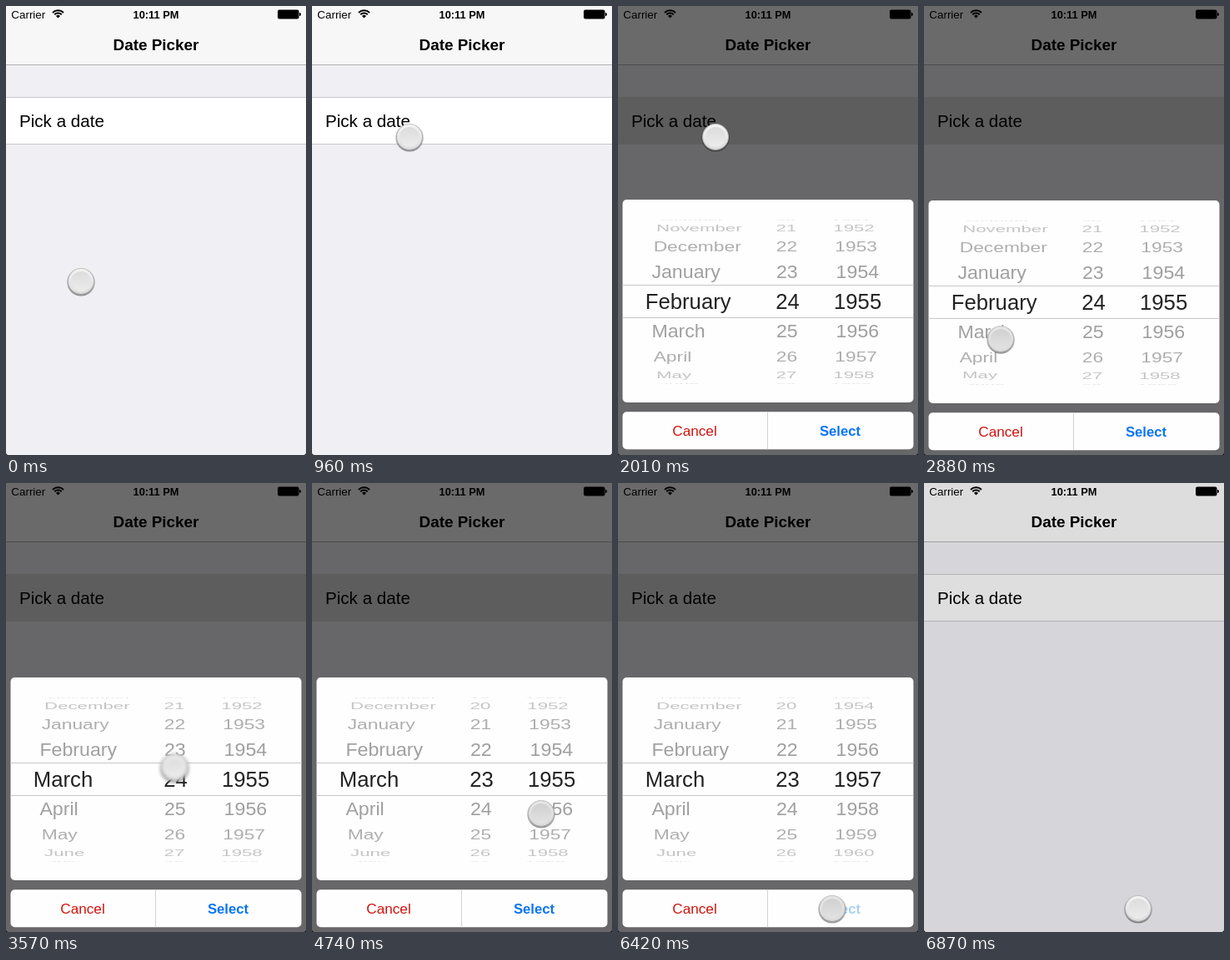
Recreate the animation shown at these times as an HTML page with a canvas. Size 360x538 px, loop 6900 ms.

```html
<!DOCTYPE html>
<html lang="en">
<head>
<meta charset="utf-8">
<title>Date Picker</title>
<style>
  html, body { margin: 0; width: 100%; height: 100%; overflow: hidden; background: #000; }
  canvas { display: block; }
</style>
</head>
<body>
<canvas id="stage" width="360" height="538"></canvas>
<script>
const W = 360, H = 538, LOOP = 6900;
const ctx = document.getElementById('stage').getContext('2d');
const FONT = '"Liberation Sans", Arial, sans-serif';
const MONTHS = ['January', 'February', 'March', 'April', 'May', 'June', 'July',
  'August', 'September', 'October', 'November', 'December'];

const mod = (n, m) => ((n % m) + m) % m;
const progress = (t, from, to) => Math.min(1, Math.max(0, (t - from) / (to - from)));
const smooth = u => u * u * (3 - 2 * u);
const easeIn = u => u * u;
const easeOut = u => u * (2 - u);
const ramp = (t, from, to) => smooth(progress(t, from, to));

// Pointer stops: time, x, y, easing of the way there
const PATH = [
  [510, 90, 330], [960, 117, 157], [2310, 117, 157],
  [2720, 92, 400], [2850, 92, 400], [3200, 95, 362], [3330, 95, 362],
  [3570, 202, 340, easeIn], [3740, 218, 420, easeOut], [4050, 218, 420],
  [4440, 218, 460], [4500, 218, 460], [4720, 275, 396], [4830, 275, 396],
  [5190, 275, 326], [5340, 275, 326], [5790, 257, 510]
];
const PRESSES = [[1590, 1680], [2780, 3230], [3960, 4470], [4720, 5220], [6420, 6600]];

function pointerAt(t) {
  const i = PATH.findIndex(stop => stop[0] > t);
  if (i === 0) return PATH[0].slice(1, 3);
  if (i < 0) return PATH[PATH.length - 1].slice(1, 3);
  const [t0, x0, y0] = PATH[i - 1], [t1, x1, y1, ease = smooth] = PATH[i];
  const u = ease(progress(t, t0, t1));
  return [x0 + (x1 - x0) * u, y0 + (y1 - y0) * u];
}

function rect(x, y, w, h, color) {
  ctx.fillStyle = color;
  ctx.fillRect(x, y, w, h);
}

function panel(x, y, w, h, r, color) {
  ctx.fillStyle = color;
  ctx.beginPath();
  ctx.roundRect(x, y, w, h, r);
  ctx.fill();
}

function text(str, x, y, size, color, align = 'left', weight = 'normal') {
  ctx.font = `${weight} ${size}px ${FONT}`;
  ctx.textAlign = align;
  ctx.fillStyle = color;
  ctx.fillText(str, x, y);
}

function drawStatusBar() {
  text('Carrier', 6.3, 15, 13.4, '#000');
  text('10:11 PM', 180, 15, 12.8, '#000', 'center', 'bold');

  ctx.strokeStyle = '#000';
  ctx.lineWidth = 2;
  for (const r of [6, 9.2]) {
    ctx.beginPath();
    ctx.arc(62.5, 14.5, r, -Math.PI * 0.75, -Math.PI * 0.25);
    ctx.stroke();
  }
  ctx.fillStyle = '#000';
  ctx.beginPath();
  ctx.moveTo(62.5, 14.5);
  ctx.arc(62.5, 14.5, 3.6, -Math.PI * 0.75, -Math.PI * 0.25);
  ctx.fill();

  panel(326, 4.5, 25.5, 11, 2, '#000');
  panel(352, 8, 2, 4, [0, 2, 2, 0], '#000');
}

function drawPage(highlight) {
  rect(0, 0, W, H, '#efeff4');
  rect(0, 0, W, 70, '#f7f7f7');
  rect(0, 70, W, 1, '#b2b2b2');
  drawStatusBar();
  text('Date Picker', 180, 52.5, 18.9, '#000', 'center', 'bold');

  const shade = 255 - 38 * highlight;
  rect(0, 109, W, 57, highlight === 1 ? '#d9d9d9' : '#c8c7cc');
  rect(0, 110, W, 55, `rgb(${shade},${shade},${shade})`);
  text('Pick a date', 16, 145, 20.6, '#000');
}

function drawRollingRows(wheel, cy) {
  const STEP = 21 * Math.PI / 180, RADIUS = 98.5;
  for (let i = Math.floor(wheel.pos) - 4; i <= wheel.pos + 5; i++) {
    const angle = (i - wheel.pos) * STEP, depth = 1 - Math.cos(angle);
    if (Math.abs(angle) > 1.52) continue;
    const zoom = 1 - 0.085 * depth, gray = 155 + 75 * depth;
    ctx.save();
    ctx.translate(180 + (wheel.x - 180) * zoom, cy + RADIUS * Math.sin(angle));
    ctx.scale(zoom, 1 - depth);
    text(wheel.label(i), 0, 8.3, 23.3, `rgb(${gray},${gray},${gray})`, wheel.align);
    ctx.restore();
  }
}

function drawLensRows(wheel, cy) {
  for (let i = Math.floor(wheel.pos) - 1; i <= wheel.pos + 2; i++) {
    text(wheel.label(i), wheel.lensX, cy + (i - wheel.pos) * 38 + 9, 25.7, '#222', wheel.align);
  }
}

function clipped(x, y, w, h, draw) {
  ctx.save();
  ctx.beginPath();
  ctx.rect(x, y, w, h);
  ctx.clip();
  draw();
  ctx.restore();
}

function drawSheet(top, t) {
  const left = 5.5, width = 349;
  panel(left, top, width, 243, 5, '#fefefe');
  const cy = top + 122;
  const wheels = [
    { pos: 1 + ramp(t, 2850, 3350), x: 39.6, lensX: 32.8, align: 'left', label: i => MONTHS[mod(i, 12)] },
    { pos: 24 - ramp(t, 4080, 4620), x: 203, lensX: 203.5, align: 'center', label: i => String(mod(i - 1, 31) + 1) },
    { pos: 1955 + 2 * ramp(t, 4850, 5450), x: 288, lensX: 287.6, align: 'center', label: String }
  ];
  const rolling = () => wheels.forEach(wheel => drawRollingRows(wheel, cy));
  clipped(left, cy - 100, width, 80, rolling);
  clipped(left, cy + 20, width, 80, rolling);
  clipped(left, cy - 19, width, 38, () => wheels.forEach(wheel => drawLensRows(wheel, cy)));
  rect(left, cy - 20, width, 1, '#c8c8c8');
  rect(left, cy + 19, width, 1, '#c8c8c8');

  panel(left, top + 254.3, width, 45, 5, '#fefefe');
  rect(179, top + 254.3, 1, 45, '#d2d2d2');
  text('Cancel', 92, top + 283, 17.2, '#d0140f', 'center');
  text('Select', 266.5, top + 283, 16.7, t >= 6420 ? '#a9d2f3' : '#0a75f5', 'center', 'bold');
}

function disc(x, y, r, topColor, bottomColor) {
  const fill = ctx.createLinearGradient(0, y - r, 0, y + r);
  fill.addColorStop(0, topColor);
  fill.addColorStop(1, bottomColor);
  ctx.fillStyle = fill;
  ctx.beginPath();
  ctx.arc(x, y, r, 0, 2 * Math.PI);
  ctx.fill();
}

function drawPointer(t) {
  const pressed = PRESSES.some(([from, to]) => t >= from && t < to);
  const [x, y] = pointerAt(t), [lastX, lastY] = pointerAt(t - 30);
  const blur = Math.hypot(x - lastX, y - lastY) * 0.08;
  ctx.filter = blur > 0.3 ? `blur(${blur}px)` : 'none';
  disc(x, y + 0.8, 16.8, 'rgba(0,0,0,.12)', 'rgba(0,0,0,.4)');
  disc(x, y, 16, '#c4c4c4', '#a0a0a0');
  disc(x, y, 15, pressed ? '#e6e6e6' : '#f4f4f4', pressed ? '#dadada' : '#dcdcdc');
  disc(x, y, 12, pressed ? '#d0d0d0' : '#dcdcdc', pressed ? '#e2e2e2' : '#ececec');
  ctx.filter = 'none';
}

function sheetTop(t) {
  const s = Math.max(0, t - 1770) / 1000 * 45;
  const rest = t < 2310 ? 232 : 233;
  const hidden = (1 + s) * Math.exp(-s) + ramp(t, 6580, 6860);
  return rest + Math.round(hidden * 307);
}

function drawCorners() {
  ctx.fillStyle = '#000';
  ctx.beginPath();
  ctx.rect(0, 0, W, H);
  ctx.roundRect(0, 0, W, H, [0, 0, 3, 3]);
  ctx.fill('evenodd');
}

function render(t) {
  const leaving = ramp(t, 6600, 6975);
  const dim = 0.57 * (ramp(t, 1650, 1940) - leaving);
  drawPage(t < 1590 ? 0 : 1 - leaving);
  rect(0, 0, W, H, `rgba(0,0,0,${Math.max(0, dim)})`);
  if (t > 1770) drawSheet(sheetTop(t), t);
  drawPointer(t);
  drawCorners();
}

const start = performance.now();
function tick() {
  render((performance.now() - start) % LOOP);
  requestAnimationFrame(tick);
}
tick();
</script>
</body>
</html>
```
